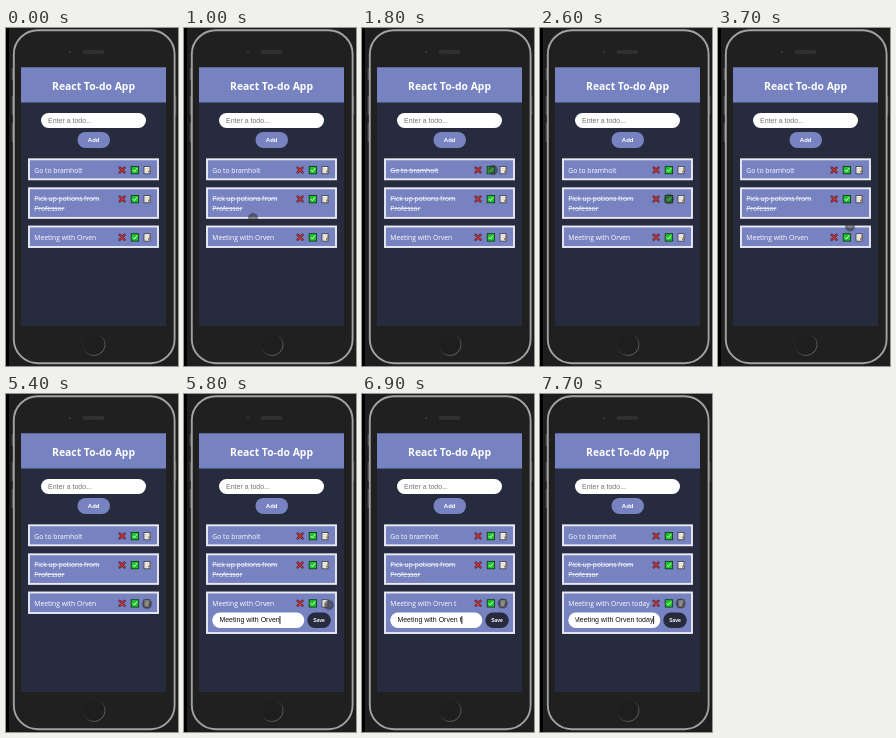
An HTML page for the animation above (8 s loop, 172 by 338 pixels).

```html
<!DOCTYPE html>
<html lang="en">
<head>
<meta charset="utf-8">
<title>To-do app on a phone</title>
<style>
  html, body { margin: 0; width: 100%; height: 100%; overflow: hidden; background: #1b1b1b; }
  svg { display: block; width: 172px; height: 338px; }
  text { fill: #fff; font-family: "Open Sans", "Noto Sans", sans-serif; white-space: pre; }
  .title { font-size: 10.4px; font-weight: 700; text-anchor: middle; }
  .task { font-size: 6.75px; font-weight: 500; }
  .done { text-decoration: line-through; }
  .field { font: 7px "Liberation Sans", Arial, sans-serif; fill: #111; }
  .button { font: bold 6px "Liberation Sans", Arial, sans-serif; text-anchor: middle; }
  .card { fill: #7782c1; stroke: #e9eaf4; stroke-width: 1.9; }
</style>
</head>
<body>
<svg viewBox="0 0 172 338">
  <defs>
    <g id="icons" stroke-linecap="round">
      <path d="M113.7 -2.4l4.8 4.8m0 -4.8l-4.8 4.8" stroke="#4a2438" stroke-width="2.5"/>
      <path d="M113.7 -2.4l4.8 4.8m0 -4.8l-4.8 4.8" stroke="#d8352f" stroke-width="1.2"/>
      <rect x="125.2" y="-3.6" width="7.4" height="7.4" fill="#1fc428" stroke="#123c20" stroke-width=".9"/>
      <path d="M127 .3l1.4 1.4 2.5 -3.2" fill="none" stroke="#e9ffe9" stroke-width=".9"/>
      <rect x="138" y="-3.6" width="6" height="7.4" fill="#f4f1eb" stroke="#3a3a44" stroke-width=".8"/>
      <path d="M139.4 -1.4h3m-3 1.7h2.4m-2.4 1.7h1.5" stroke="#bbb" stroke-width=".5"/>
      <path d="M142.6 1.9l2.2 -2.7" stroke="#5b4026" stroke-width="1.2"/>
      <path d="M142.7 1.7l2 -2.4" stroke="#e6b34d" stroke-width=".7"/>
    </g>
    <clipPath id="fieldClip"><rect x="35.3" y="218" width="79" height="16"/></clipPath>
    <radialGradient id="touch">
      <stop offset="0" stop-color="#333" stop-opacity=".45"/>
      <stop offset=".75" stop-color="#2b2b2b" stop-opacity=".6"/>
      <stop offset="1" stop-color="#2b2b2b" stop-opacity=".15"/>
    </radialGradient>
    <linearGradient id="ring" x2="1" y2="1">
      <stop offset=".35" stop-color="#222"/>
      <stop offset="1" stop-color="#777"/>
    </linearGradient>
  </defs>

  <!-- phone -->
  <rect width="172" height="338" fill="#1e1e1e"/>
  <rect width="3" height="338" fill="#000"/>
  <path d="M6.5 40v12M6.5 68v19M6.5 95v19M169.5 68v19" stroke="#4c4c4c" stroke-width="1.6"/>
  <rect x="7.8" y="2.2" width="160.8" height="333" rx="24" fill="#202020" stroke="#a2a2a2" stroke-width="1.9"/>
  <circle cx="64" cy="24" r="1.3" fill="#30343d"/>
  <rect x="77" y="22.6" width="21" height="2.6" rx="1.3" fill="#303030" stroke="#3d3d3d" stroke-width=".5"/>
  <circle cx="88" cy="316.5" r="11" fill="#1e1e1e" stroke="url(#ring)"/>

  <!-- app -->
  <rect x="15" y="39.3" width="145" height="258.7" fill="#272b3e"/>
  <rect x="15" y="39.3" width="145" height="35.2" fill="#7782c1"/>
  <text class="title" x="87.5" y="61.6">React To-do App</text>
  <rect x="35" y="85" width="105" height="15" rx="7.5" fill="#fff"/>
  <text class="field" x="42" y="95" style="fill:#757575">Enter a todo...</text>
  <rect x="71.5" y="104" width="32.5" height="16" rx="8" fill="#7782c1"/>
  <text class="button" x="87.7" y="114.4">Add</text>

  <rect class="card" x="23" y="131.3" width="129" height="20"/>
  <text class="task" id="task1" x="28.3" y="144.6">Go to bramholt</text>
  <use href="#icons" y="142"/>
  <rect class="card" x="23" y="160.3" width="129" height="29.6"/>
  <g id="task2">
    <text class="task" x="28.3" y="173.2">Pick up potions from</text>
    <text class="task" x="28.3" y="182.8">Professor</text>
  </g>
  <use href="#icons" y="171"/>
  <rect class="card" id="card3" x="23" y="198.5" width="129" height="20.5"/>
  <text class="task" id="task3" x="28.3" y="211.9"></text>
  <use href="#icons" y="209.3"/>

  <g id="editor">
    <rect x="28.3" y="218.5" width="92" height="15.5" rx="7.75" fill="#fff"/>
    <g clip-path="url(#fieldClip)"><text class="field" id="draft" y="228.4"></text></g>
    <rect id="caret" y="222" width=".9" height="8" fill="#111"/>
    <rect x="123.3" y="218.5" width="23.5" height="15.5" rx="7.75" fill="#272b3e"/>
    <text class="button" x="135" y="228" style="font-size:5px">Save</text>
  </g>
  <circle id="cursor" r="5.4" fill="url(#touch)"/>
</svg>

<script>
const LOOP = 8000, STEP = 100;
const EDIT_AT = 5500;
const FIELD_X = 35.4, FIELD_WIDTH = 78;
const SUFFIX = " today";
const keyTimes = [6700, 6900, 7000, 7200, 7500, 7700];

// [time, x, y] stops of the touch pointer
const path = [
  [600, 169, 192], [800, 120, 202], [1000, 69, 190], [1200, 95, 162],
  [1400, 138, 143], [1500, 131, 142], [2200, 131, 142], [2500, 130, 169],
  [2600, 129, 171], [3300, 129, 172], [3700, 132, 198.5], [3900, 129, 210],
  [4800, 129, 210.5], [5200, 141, 210], [5500, 141, 210], [5700, 145, 211],
  [5800, 145, 211], [6000, 140.5, 209.5]
];

const el = id => document.getElementById(id);
const show = (id, on) => el(id).style.display = on ? "" : "none";
const within = (t, from, to) => t >= from && t < to;
const setDone = (id, done) => {
  const node = el(id);
  const texts = node.tagName === "g" ? [...node.children] : [node];
  texts.forEach(text => text.classList.toggle("done", done));
};

function pointerAt(t) {
  const next = path.findIndex(stop => stop[0] > t);
  if (next < 0) return path.at(-1).slice(1);
  const [t0, x0, y0] = path[next - 1], [t1, x1, y1] = path[next];
  const k = (t - t0) / (t1 - t0);
  return [x0 + (x1 - x0) * k, y0 + (y1 - y0) * k];
}

function drawEditor(t, title) {
  const open = t >= EDIT_AT;
  show("editor", open);
  el("card3").setAttribute("height", open ? 40.5 : 20.5);
  if (!open) return;
  const draft = el("draft");
  draft.textContent = title;
  const width = draft.getComputedTextLength();
  const x = FIELD_X - Math.max(0, width - FIELD_WIDTH);
  draft.setAttribute("x", x);
  el("caret").setAttribute("x", x + width - 0.2);
  show("caret", !within(t, 6000, 6500));
}

function draw(t) {
  const typed = keyTimes.filter(time => time <= t).length;
  const title = "Meeting with Orven" + SUFFIX.slice(0, typed);
  el("task3").textContent = title;
  setDone("task1", within(t, 1800, 2200));
  setDone("task2", !within(t, 2800, 3200));
  setDone("task3", within(t, 4000, 4400));
  drawEditor(t, title);

  const visible = t >= path[0][0];
  show("cursor", visible);
  if (visible) {
    const [x, y] = pointerAt(t);
    el("cursor").setAttribute("cx", x);
    el("cursor").setAttribute("cy", y);
  }
}

const start = performance.now();
function tick() {
  const t = (performance.now() - start) % LOOP;
  draw(Math.floor(t / STEP) * STEP);
  requestAnimationFrame(tick);
}
tick();
</script>
</body>
</html>
```
